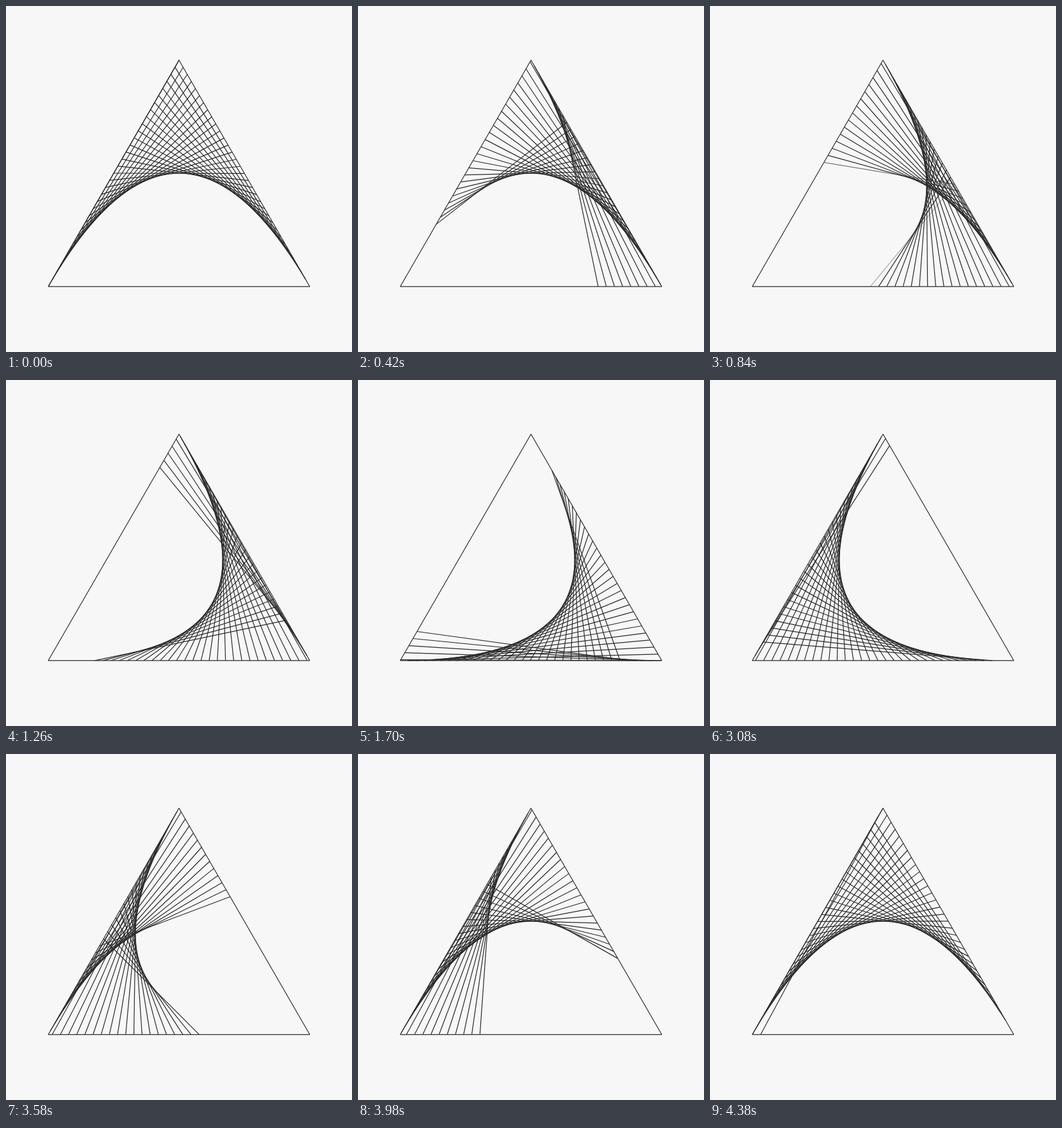
These frames come from a looping animation (540x540 px, 4.4 s). An HTML page with a canvas:

```html
<!DOCTYPE html>
<html lang="en">
<head>
<meta charset="utf-8">
<title>String triangle</title>
<style>
  html, body { margin: 0; width: 100%; height: 100%; overflow: hidden; background: #f7f7f7; }
  canvas { display: block; }
</style>
</head>
<body>
<canvas id="stage" width="540" height="540"></canvas>
<script>
const ctx = document.getElementById('stage').getContext('2d');
const corners = [[66, 437.8], [270, 84.5], [474, 437.8]];
const STRINGS = 32;   // strings per side
const DRIFT = 8;      // spacings every string slides per loop
const JUMPS = 88;     // strings moved from tail to head per loop
const STEP = 20, STEPS = 220, SHUTTER = 0.8;

// Point on the outline, measured in string spacings from the left corner.
function outlinePoint(pos) {
  const side = Math.floor(pos / STRINGS), f = pos / STRINGS - side;
  const [x0, y0] = corners[side % 3], [x1, y1] = corners[(side + 1) % 3];
  return [x0 + (x1 - x0) * f, y0 + (y1 - y0) * f];
}

function drawString(pos, alpha) {
  ctx.globalAlpha = alpha;
  ctx.beginPath();
  ctx.moveTo(...outlinePoint(pos));
  ctx.lineTo(...outlinePoint(pos + STRINGS));
  ctx.stroke();
}

function draw(ms) {
  const step = Math.floor(ms / STEP) % STEPS;
  const drift = DRIFT * (step + SHUTTER / 2) / STEPS;
  const jumps = JUMPS * step / STEPS;
  const tail = Math.floor(jumps + 1e-9);

  // Share of the exposure after the next tail-to-head jump.
  const untilJump = (tail + 1 - jumps) * STEPS / JUMPS;
  const moved = Math.max(0, 1 - untilJump / SHUTTER);

  ctx.globalAlpha = 1;
  ctx.fillStyle = '#f7f7f7';
  ctx.fillRect(0, 0, 540, 540);
  ctx.strokeStyle = '#2b2b2b';
  ctx.lineWidth = 1.2;
  ctx.lineJoin = 'round';
  ctx.beginPath();
  corners.forEach(([x, y]) => ctx.lineTo(x, y));
  ctx.closePath();
  ctx.stroke();

  drawString(tail + drift, 1 - moved);
  for (let i = 1; i < STRINGS; i++) drawString(tail + i + drift, 1);
  drawString(tail + STRINGS + drift, moved);
}

function tick(now) {
  draw(now);
  requestAnimationFrame(tick);
}
draw(0);
requestAnimationFrame(tick);
</script>
</body>
</html>
```
